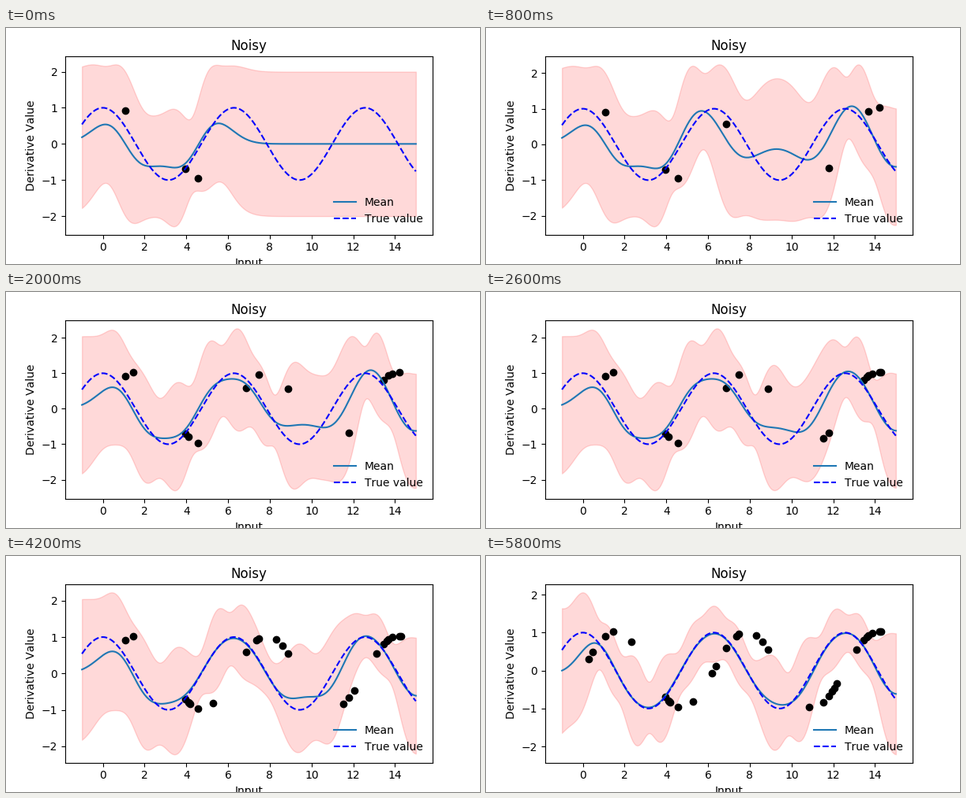
A matplotlib script that plays this animation: 600 by 300 pixels, repeating every 6 s.

```python
import numpy as np
import matplotlib.pyplot as plt
from matplotlib.animation import FuncAnimation

LENGTH = 0.96  # kernel length scale; the prior slope has unit variance
NOISE = 0.07   # observation noise relative to the signal variance
BIAS = 0.03    # mean offset of the measurements
START = 3      # observations visible at the beginning of the loop
FRAMES = 30

# Inputs in the order they are sampled.
inputs = np.array([
    1.08, 3.96, 4.56, 6.87, 11.79, 13.69, 14.21, 1.45,
    13.45, 13.87, 4.1, 7.47, 8.87, 11.52, 13.6, 14.28,
    7.36, 8.3, 5.28, 12.05, 4.18, 13.11, 8.61, 4.15,
    0.28, 11.94, 6.19, 0.48, 12.18, 2.33, 6.38, 10.84,
])
values = np.sin(inputs) + BIAS

grid = np.linspace(-1, 15, 300)
truth = np.cos(grid)


def rbf(a, b):
    return np.exp(-0.5 * ((a[:, None] - b) / LENGTH) ** 2)


def derivative_posterior(x, y):
    """Mean and standard deviation of the derivative of the GP."""
    cov = LENGTH ** 2 * (rbf(x, x) + NOISE * np.eye(len(x)))
    cross = (x - grid[:, None]) * rbf(grid, x)
    weights = np.linalg.solve(cov, cross.T).T
    var = 1 - np.sum(cross * weights, axis=1)
    return weights @ y, np.sqrt(np.maximum(var, 0))


plt.rcParams["font.family"] = "DejaVu Sans"
plt.rcParams["text.kerning_factor"] = 6
fig, ax = plt.subplots(figsize=(6, 3), dpi=100)
fig.subplots_adjust(left=0.125, right=0.9, bottom=0.125, top=0.88)

band = ax.fill_between(grid, truth, truth, color="red", alpha=0.15)
dots, = ax.plot([], [], "ko")
mean_line, = ax.plot(grid, truth, color="#1f77b4", label="Mean")
ax.plot(grid, truth, "b--", label="True value")

ax.set_title("Noisy")
ax.set_xlabel("Input")
ax.set_ylabel("Derivative Value")
ax.set_xlim(-1.8, 15.8)
ax.set_yticks(range(-2, 3))
ax.legend(loc="lower right", frameon=False)


def update(i):
    x, y = inputs[:START + i], values[:START + i]
    mean, std = derivative_posterior(x, y)
    low, high = mean - 2 * std, mean + 2 * std

    upper = np.column_stack([grid, high])
    lower = np.column_stack([grid, low])
    band.set_verts([np.vstack([upper, lower[::-1]])])
    mean_line.set_ydata(mean)
    dots.set_data(x, y)

    margin = 0.05 * (high.max() - low.min())
    ax.set_ylim(low.min() - margin, high.max() + margin)
    return band, dots, mean_line


anim = FuncAnimation(fig, update, frames=FRAMES, interval=200,
                     repeat=True, repeat_delay=0, blit=False)
plt.show()
```
